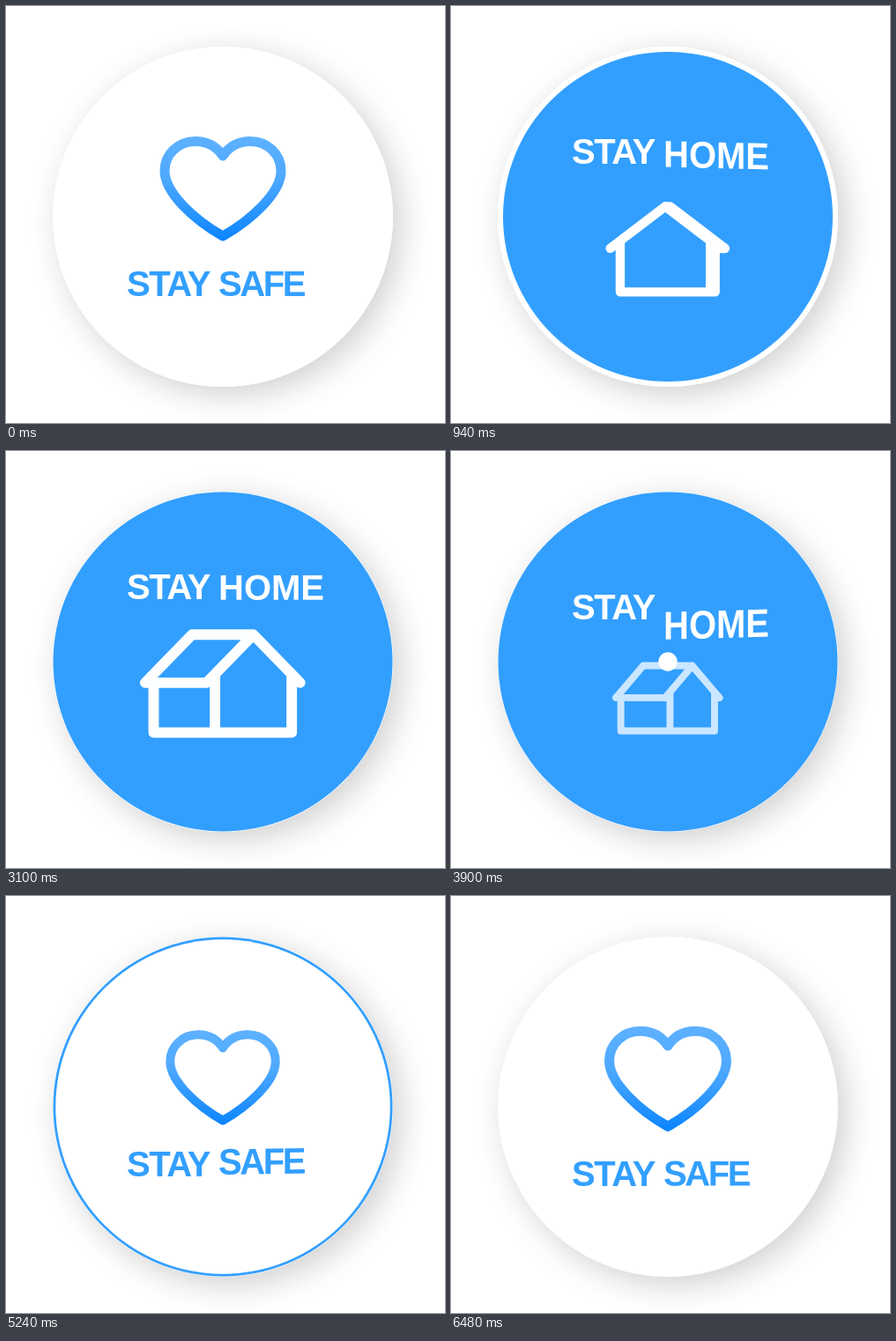
An HTML page with a canvas for the animation above (6540 ms loop, 498x473 px).

```html
<!DOCTYPE html>
<html lang="en">
<head>
<meta charset="utf-8">
<title>Stay home, stay safe</title>
<style>
  html, body { margin: 0; width: 100%; height: 100%; overflow: hidden; background: #fff; }
  canvas { display: block; }
</style>
</head>
<body>
<canvas id="stage" width="498" height="473"></canvas>
<script>
const ctx = document.getElementById('stage').getContext('2d');
const LOOP = 6540, TURN = 2700, WHITE_START = 3866;
const BLUE = '#329fff', CX = 246, CY = 239, R = 193;

const clamp = (v, lo, hi) => Math.min(hi, Math.max(lo, v));
const progress = (t, start, length) => clamp((t - start) / length, 0, 1);
const easeIn = (t, start, length, power) => progress(t, start, length) ** power;
const easeOut = (t, start, length, power) => 1 - (1 - progress(t, start, length)) ** power;

// Underdamped spring from 0 to 1; rates are per second.
function spring(t, start, damping, freq) {
  const s = Math.max(0, t - start) / 1000, a = freq * s;
  return 1 - Math.exp(-damping * s) * (Math.cos(a) + damping / freq * Math.sin(a));
}

// Baseline of the text: a quick rise, later a slow S-shaped fall.
function textY(t) {
  const low = 329.5, travel = 162;
  if (t < 2000) return low - travel * easeOut(t, 0, 2000, 4.2);
  return low - travel + travel / (1 + (2362 / (t - 2000)) ** 8.2);
}

function disc(r, color) {
  ctx.beginPath();
  ctx.arc(CX, CY, r, 0, 2 * Math.PI);
  ctx.fillStyle = color;
  ctx.fill();
}

// The second word trails while arriving and runs ahead while leaving.
function drawText(t, word, arriving, color, spacing) {
  const y = textY(t);
  const shift = textY(arriving ? t - 100 : t + Math.min(t, 200)) - y;
  const bend = clamp(shift, -25, 25);
  const skew = bend * (arriving ? 0.005 : -0.00125);
  const stretch = 1 + Math.abs(bend) * (arriving ? 0.013 : 0.006);
  ctx.font = 'bold 40px "Liberation Sans", Arial, sans-serif';
  ctx.fillStyle = color;
  ctx.letterSpacing = '-1.5px';
  ctx.fillText('STAY', 137, y);
  ctx.save();
  ctx.transform(1, skew, 0, stretch, 241, y + shift - skew * 55);
  ctx.letterSpacing = spacing;
  ctx.fillText(word, 0, 0);
  ctx.restore();
}

function drawHouse(t) {
  const shrink = easeIn(t, TURN, 1650, 3.4);
  const scale = easeOut(t, 300, 1100, 2.3) - shrink;
  if (scale <= 0) return;

  // Turning narrows the gable and swings the side wall from right to left.
  const gable = 118 - 0.014 * (t - 940);
  const side = 118 * (1 - Math.exp((1060 - t) / 2260));
  const left = Math.max(side, 0) - (gable + Math.abs(side)) / 2;
  const right = left + gable, apex = left + gable / 2, over = gable * 0.11;
  const wall = side > 0 ? left : right;
  const eave = side > 0 ? left - over : right + over;
  const line = (...pts) => pts.forEach(([x, y], i) => i ? ctx.lineTo(x, -y) : ctx.moveTo(x, -y));

  ctx.save();
  ctx.translate(245.8, 326.5 - 0.0023 * t);
  ctx.scale(scale, scale);
  ctx.globalAlpha = 1 - 0.75 * shrink;
  ctx.strokeStyle = '#fff';
  ctx.lineWidth = 12;
  ctx.lineCap = ctx.lineJoin = 'round';
  ctx.beginPath();
  line([left, 65], [left, 0], [right, 0], [right, 65]);
  line([left - over, 57], [apex, 112], [right + over, 57]);
  line([apex, 112], [apex - side, 112], [eave - side, 57], [eave, 57]);
  line([wall - side, 57], [wall - side, 0], [wall, 0]);
  ctx.stroke();
  ctx.restore();
}

const heartPath = new Path2D(`M0-37.5C-7-48-18-54-31-54C-51-54-66-39-66-20.5
  C-66 5-31 36 0 53.5C31 36 66 5 66-20.5C66-39 51-54 31-54C18-54 7-48 0-37.5Z`);
const heartFill = ctx.createLinearGradient(0, -60, 0, 60);
heartFill.addColorStop(0, '#5eb1ff');
heartFill.addColorStop(0.4, '#4ea9ff');
heartFill.addColorStop(1, '#0a84ff');

function drawHeart(t) {
  const scale = t < TURN ? 1 - easeIn(t, 0, 500, 1.5) : spring(t, 4405, 2.5, 2.24);
  if (scale <= 0) return;
  ctx.save();
  ctx.translate(CX, 207.5 - 13.7 * (1 - scale));
  ctx.scale(scale, scale);
  ctx.strokeStyle = heartFill;
  ctx.lineWidth = 11;
  ctx.lineJoin = 'round';
  ctx.stroke(heartPath);
  ctx.restore();
}

function homeScene(t) {
  drawHouse(t);
  drawText(t, 'HOME', t < TURN, '#fff', '0px');
}

function safeScene(t) {
  drawHeart(t);
  drawText(t, 'SAFE', t > TURN, BLUE, '-2.4px');
}

function reveal(t, r, color, scene) {
  if (r <= 0) return;
  ctx.save();
  disc(r, color);
  ctx.clip();
  scene(t);
  ctx.restore();
}

function render(t) {
  ctx.fillStyle = '#fff';
  ctx.fillRect(0, 0, 498, 473);
  ctx.save();
  ctx.shadowColor = 'rgba(0,0,0,0.19)';
  ctx.shadowBlur = 36;
  ctx.shadowOffsetX = ctx.shadowOffsetY = 9;
  disc(R, '#fff');
  ctx.restore();
  if (t < WHITE_START) {
    reveal(t, R, '#fff', safeScene);
    reveal(t, (R - 0.5) * easeOut(t, 20, 1480, 3.65), BLUE, homeScene);
  } else {
    reveal(t, R - 0.5, BLUE, homeScene);
    reveal(t, R * easeOut(t, WHITE_START, 1850, 3), '#fff', safeScene);
  }
}

const start = performance.now();
function tick() {
  render((performance.now() - start) % LOOP);
  requestAnimationFrame(tick);
}
tick();
</script>
</body>
</html>
```
